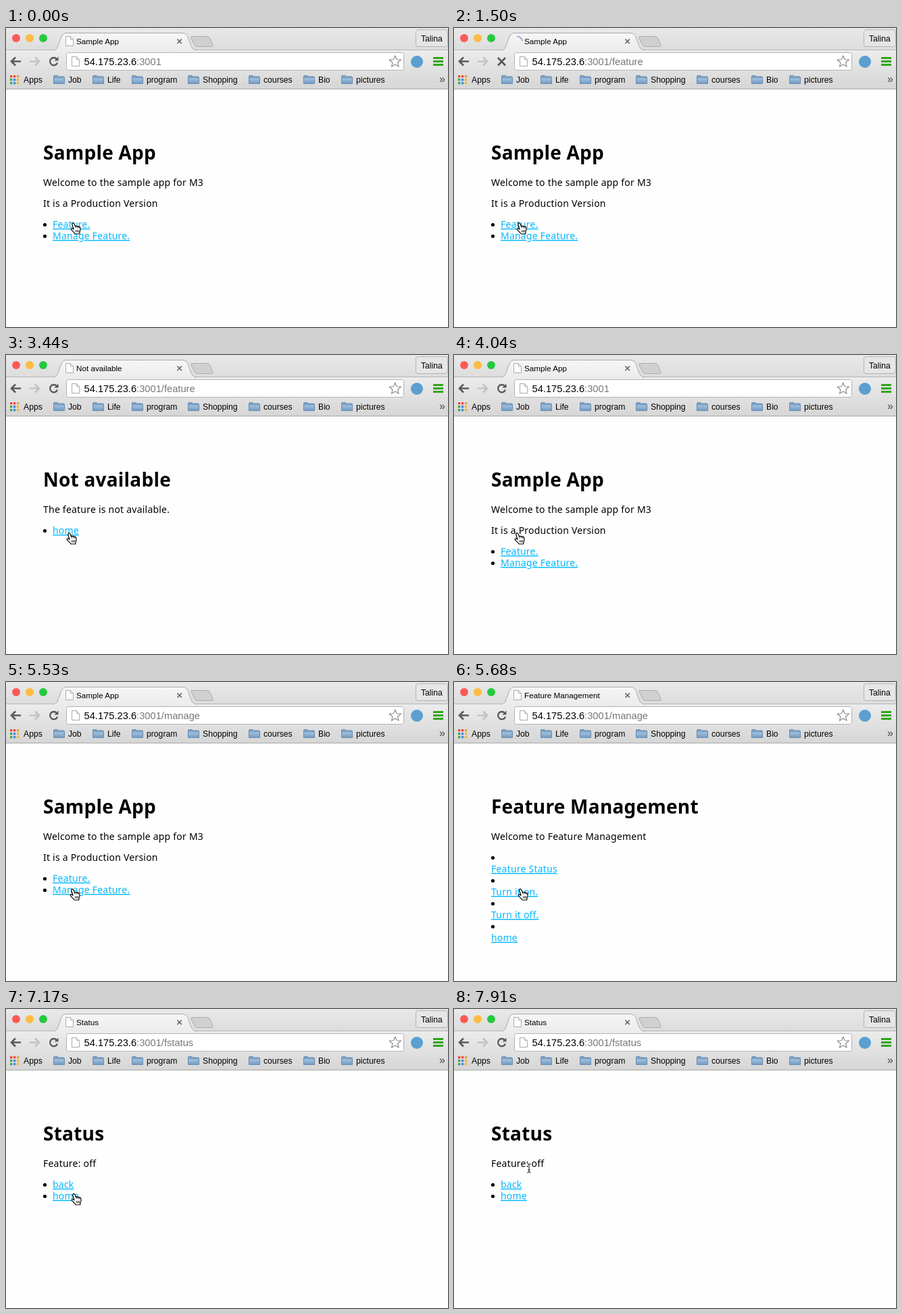
These frames come from a looping animation (654 px wide and 443 px high, 8 s). An HTML page:

```html
<!DOCTYPE html>
<html lang="en">
<head>
<meta charset="utf-8">
<title>Browser demo</title>
<style>
html, body { margin: 0; width: 100%; height: 100%; overflow: hidden; background: #fff; }
svg { display: block; width: 654px; height: 443px; }
text { white-space: pre; }
.ui { font: 12.2px "Liberation Sans", Arial, sans-serif; }
.tab { font-size: 11.7px; }
.url { font-size: 14.7px; }
.page { font: 14px "Noto Sans", "Open Sans", sans-serif; letter-spacing: .22px; }
.page .head { font-size: 28px; font-weight: 700; }
.page .link { fill: #00b7ff; font-weight: 500; text-decoration: underline; }
.line { fill: none; stroke: #5a5a5a; stroke-width: 2.6; }
</style>
</head>
<body>
<svg viewBox="0 0 654 443">
  <defs>
    <linearGradient id="strip" x2="0" y2="1"><stop stop-color="#e9e9e9"/><stop offset="1" stop-color="#dcdcdc"/></linearGradient>
    <linearGradient id="bar" x2="0" y2="1"><stop stop-color="#ececec"/><stop offset="1" stop-color="#d6d6d6"/></linearGradient>
    <linearGradient id="tab" x2="0" y2="1"><stop stop-color="#f6f6f6"/><stop offset="1" stop-color="#ececec"/></linearGradient>
    <linearGradient id="blue" x2="0" y2="1"><stop stop-color="#a5c3de"/><stop offset="1" stop-color="#7099c0"/></linearGradient>
    <g id="doc">
      <path d="M.5 .5H7.5L11.5 4.5V14.5H.5Z" fill="#fff" stroke="#aaa"/>
      <path d="M7.5 .5V4.5H11.5" fill="#eee" stroke="#aaa"/>
    </g>
    <g id="folder">
      <path d="M.5 2Q.5 .5 2 .5H6L7.5 2H15Q16.5 2 16.5 3.5V12.5H.5Z" fill="#7ba3c8" stroke="#6689aa"/>
      <path d="M1 4.5H16V12.5H1Z" fill="url(#blue)"/>
    </g>
    <g id="hand" stroke="#000" stroke-linejoin="round">
      <path fill="#fff" stroke-width="1.2" d="M3 1.4C3.8 .3 5.3 .6 5.8 1.8L7.6 6C8.2 5 9.8 5 10.3 6.2C11 5.3 12.3 5.5 12.6 6.7C13.5 6 14.6 6.6 14.8 7.8C15.4 10 15 12 14 14L13.8 17H7C6 15 3.5 13 1.5 10.8C.5 9.5 1.8 8.3 3.2 9L5 10.2L2.8 3Z"/>
      <path fill="none" stroke-width=".9" d="M7.6 6L8.3 8.3M10.3 6.2L10.9 8.4M12.6 6.7L13 8.6M8.4 11.5L8.7 14.5M10.4 11.3L10.6 14.5M12.3 11.2V14.5"/>
    </g>
    <g id="arrow">
      <path d="M2 1V15.5L5.3 12.5L7.5 17.5L10.2 16.3L8 11.5H12.3Z" transform="translate(.4 .8)" fill="#000" opacity=".2"/>
      <path d="M2 .3V14.2L5.2 11.2L7.4 16.4L9.7 15.4L7.5 10.4H11.8Z" fill="#000" stroke="#fff" stroke-width=".8"/>
    </g>
    <path id="beam" d="M4.3 3Q7 3 7 5V14.5Q7 16.5 4.3 16.5M9.7 3Q7 3 7 5M7 14.5Q7 16.5 9.7 16.5M5.5 12.5H8.5" fill="none" stroke="#111"/>
  </defs>

  <rect width="654" height="443" fill="#fefefe"/>
  <rect width="654" height="34" fill="url(#strip)"/>
  <rect y="33" width="654" height="57" fill="url(#bar)"/>
  <path d="M0 90.5H654" stroke="#a9a9a9"/>
  <path d="M0 32.5H70" stroke="#b5b5b5"/>
  <path d="M280 32.5H654" stroke="#b5b5b5"/>
  <path d="M69 33C76 32 76 29 78 24L82 13Q84 8 89 7.500H262Q267 8 269 13L273 24C275 29 276 32 282 33" fill="url(#tab)" stroke="#a9a9a9"/>
  <path d="M274 12.500H298Q300 12.500 301 14L306 25Q307 27.500 304 27.500H283Q280 27.500 279 25L274 15Z" fill="#d0d0d0" stroke="#adadad"/>
  <circle cx="15" cy="15" r="6" fill="#fc5b57"/>
  <circle cx="35" cy="15" r="6" fill="#fdbc40"/>
  <circle cx="55" cy="15" r="6" fill="#27c840"/>
  <path d="M253.500 16.500L260 23M260 16.500L253.500 23" stroke="#666" stroke-width="1.6"/>
  <rect x="606.500" y="2.500" width="47" height="25" rx="3" fill="#e6e6e6" stroke="#b3b3b3"/>

  <path class="line" d="M8 49.500H22M14 43.500L8 49.500L14 55.500"/>
  <path class="line" d="M35 49.500H49M43 43.500L49 49.500L43 55.500" style="stroke:#c3c3c3"/>
  <g id="reload">
    <path class="line" d="M75 46A5.600 5.600 0 1 0 76 51.500" style="stroke-width:2.3"/>
    <path d="M77.500 42.500V48.500H71.500Z" fill="#5a5a5a"/>
  </g>
  <path id="stop" class="line" d="M65 44L76 55.500M76 44L65 55.500"/>
  <rect x="89.500" y="36.500" width="499" height="26" rx="3" fill="#fff" stroke="#b4b4b4"/>
  <use href="#doc" x="97" y="42"/>
  <use id="tabDoc" href="#doc" x="88" y="12"/>
  <path id="spin" d="M93 12.500A7.500 7.500 0 0 1 101 19" fill="none" stroke="#a3b1d0" stroke-width="2.2"/>
  <path id="star" fill="#fff" stroke="#8d8d8d" stroke-width="1.200" stroke-linejoin="round"/>
  <circle cx="608" cy="50" r="9" fill="#5b9fd0"/>
  <path d="M632 44.500H647M632 49.500H647M632 54.500H647" stroke="#33a514" stroke-width="3"/>
  <g id="marks"></g>
  <g class="ui">
    <text x="614" y="20">Talina</text>
    <text id="title" class="tab" x="104" y="24"></text>
    <text class="url" x="115.500" y="55">54.175.23.6<tspan id="path" fill="#777"></tspan></text>
    <text x="641" y="81" font-size="16" fill="#444">»</text>
  </g>
  <g id="page" class="page"></g>
  <use id="cursor"/>
</svg>
<script>
const $ = id => document.getElementById(id);
const text = (x, y, s, cls = "") => `<text x="${x}" y="${y}" class="${cls}">${s}</text>`;
const dot = y => `<circle cx="57.500" cy="${y}" r="2.600"/>`;
const head = s => text(55, 195, s, "head");
const item = (y, s) => dot(y - 4.5) + text(69, y, s, "link");
const block = (y, s) => dot(y - 21.5) + text(55, y, s, "link");

const views = {
  "Sample App": head("Sample App") + text(55, 234, "Welcome to the sample app for M3") +
    text(55, 265, "It is a Production Version") + item(296, "Feature.") + item(313, "Manage Feature."),
  "Not available": head("Not available") + text(55, 234, "The feature is not available.") + item(265, "home"),
  "Feature Management": head("Feature Management") + text(55, 234, "Welcome to Feature Management") +
    ["Feature Status", "Turn it on.", "Turn it off.", "home"].map((s, i) => block(282 + 34 * i, s)).join(""),
  "Status": head("Status") + text(55, 234, "Feature: off") + item(265, "back") + item(282, "home")
};

// start time, page title, path, loading
const visits = [
  [0, "Sample App", ""], [1500, "Sample App", "/feature", true],
  [1650, "Not available", "/feature"], [3890, "Not available", "/feature", true],
  [4040, "Sample App", ""], [5530, "Sample App", "/manage"],
  [5680, "Feature Management", "/manage"], [7020, "Feature Management", "/manage", true],
  [7170, "Status", "/fstatus"]
];
// start time, cursor, left, top
const moves = [
  [0, "hand", 95, 288], [150, "hand", 92, 288], [2540, "arrow", 95, 272], [2690, "arrow", 93, 268],
  [3440, "hand", 89, 263], [4640, "hand", 91, 289], [4780, "hand", 93, 303], [4930, "hand", 94, 305],
  [5080, "hand", 94, 306], [6130, "hand", 94, 296], [6280, "hand", 94, 279], [6430, "hand", 94, 270],
  [6730, "hand", 96, 273], [7470, "hand", 97, 269], [7610, "arrow", 104, 250], [7760, "arrow", 104, 236],
  [7910, "beam", 104, 226]
];

const folders = { Job: 70, Life: 128, program: 186, Shopping: 269, courses: 359, Bio: 440, pictures: 496 };
const colors = ["#e8453c", "#e8453c", "#f39c2d", "#35a853", "#4285f4", "#f6b828", "#35a853", "#4285f4", "#f6b828"];
$("marks").innerHTML = colors.map((c, i) =>
    `<rect x="${6 + i % 3 * 5}" y="${70 + (i / 3 | 0) * 5}" width="3.300" height="3.300" fill="${c}"/>`).join("") +
  Object.values(folders).map(x => `<use href="#folder" x="${x}" y="70"/>`).join("") +
  `<g class="ui">${text(26, 81, "Apps")}${Object.entries(folders).map(([s, x]) => text(x + 22, 81, s)).join("")}</g>`;

$("star").setAttribute("d", "M" + Array.from({ length: 10 }, (_, i) => {
  const a = i * Math.PI / 5, r = i % 2 ? 4 : 9;
  return [575.8 + r * Math.sin(a), 50 - r * Math.cos(a)];
}).join("L") + "Z");

const at = (list, t) => list.findLast(e => e[0] <= t);
const show = (id, on) => $(id).style.display = on ? "" : "none";
let visit;

function draw(now) {
  const t = now % 8000, v = at(visits, t), [, shape, x, y] = at(moves, t);
  if (v !== visit) {
    visit = v;
    const [, title, path, loading] = v;
    $("title").textContent = title;
    $("path").textContent = ":3001" + path;
    $("page").innerHTML = views[title];
    show("reload", !loading);
    show("tabDoc", !loading);
    show("stop", loading);
    show("spin", loading);
  }
  $("cursor").setAttribute("href", "#" + shape);
  $("cursor").setAttribute("transform", `translate(${x} ${y})`);
  requestAnimationFrame(() => draw(performance.now() - start));
}
const start = performance.now();
draw(0);
</script>
</body>
</html>
```
